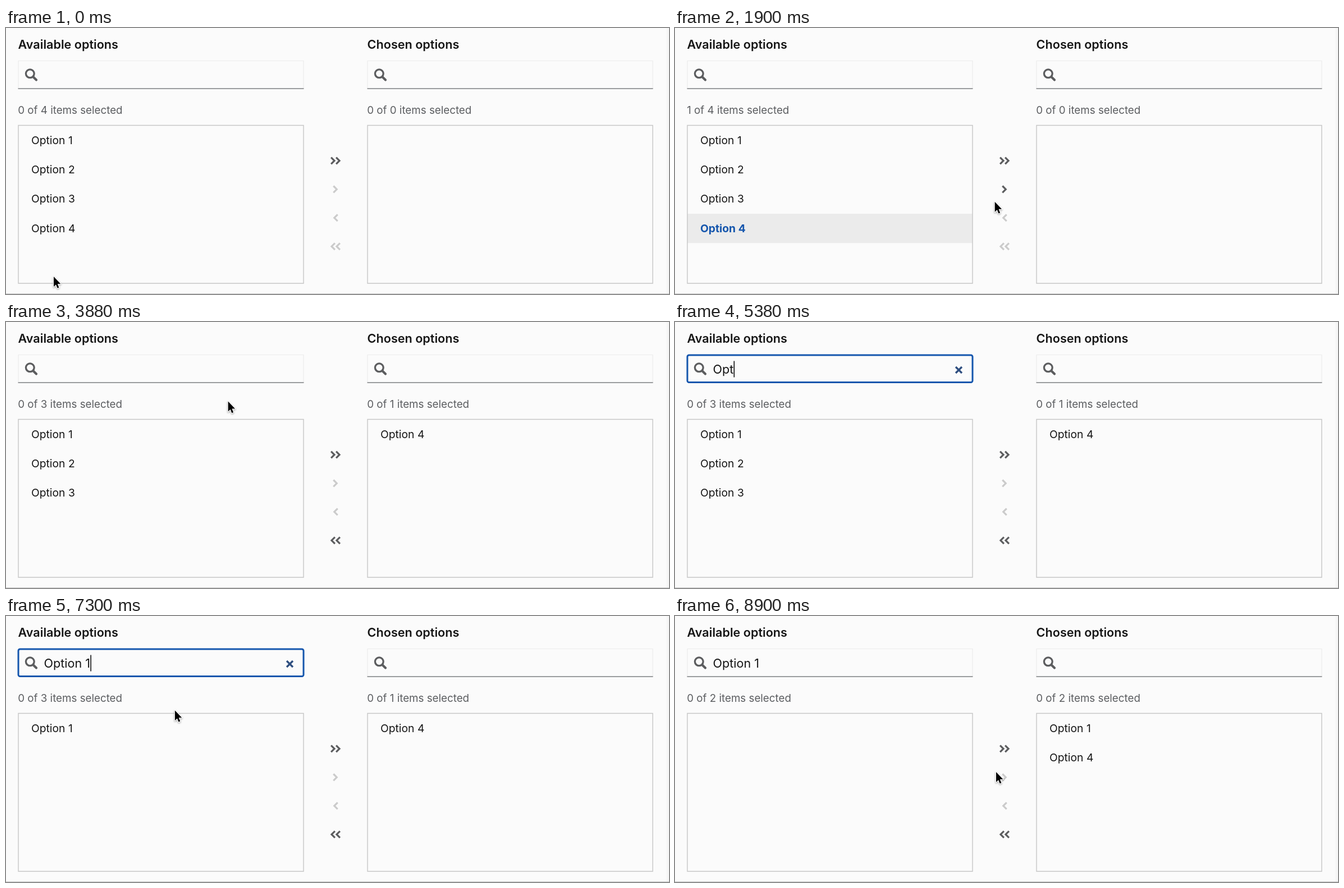
An HTML page with a canvas for the animation above (9540 ms loop, 1181x474 px).

```html
<!DOCTYPE html>
<html lang="en">
<head>
<meta charset="utf-8">
<title>Dual list selector</title>
<style>
  html, body { margin: 0; width: 100%; height: 100%; overflow: hidden; background: #fbfbfb; }
  canvas { display: block; width: 1181px; height: 474px; }
</style>
</head>
<body>
<canvas id="stage"></canvas>
<script>
const W = 1181, H = 474, LOOP = 9540;
const FONT = 'Inter, "Open Sans", sans-serif';
const INK = '#151515', GREY = '#5c5d5f', FAINT = '#cbcbcb', BLUE = '#1556ad';
const LEFT = 22, RIGHT = 644, PANEL = 508, ROW_TOP = 174, ROW = 52.3;

const canvas = document.getElementById('stage');
const ctx = canvas.getContext('2d');
const dpr = window.devicePixelRatio || 1;
canvas.width = Math.round(W * dpr);
canvas.height = Math.round(H * dpr);

// Event times in ms
const PICK_4 = 1060, MOVE_4 = 3120, FOCUS = 4320, PICK_1 = 7760, MOVE_1 = 8780;
const QUERY = 'Option 1', TYPE_START = 5084, KEY_GAP = 148, POINTER_BACK = 6880;
const BLINK = 480;

// Each move starts where the last one ended; sag bows the path downwards
const HOME = { x: 85, y: 443 };
const MOVES = [
  { from: 40, to: 600, x: 123, y: 353, sag: 0 },
  { from: 1060, to: 2000, x: 584, y: 302, sag: 52 },
  { from: 2020, to: 2960, x: 586, y: 297, sag: 40 },
  { from: 3560, to: 4040, x: 330, y: 88, sag: 0 },
  { from: 6880, to: 7720, x: 272, y: 190, sag: 29 },
  { from: 7840, to: 8200, x: 572, y: 278, sag: 0 }
];

const clamp = u => Math.min(1, Math.max(0, u));
const ease = u => u * u * (3 - 2 * u);

function pointerAt(t) {
  return MOVES.reduce((p, m) => {
    const e = ease(clamp((t - m.from) / (m.to - m.from)));
    return {
      x: p.x + (m.x - p.x) * e,
      y: p.y + (m.y - p.y) * e + m.sag * 4 * e * (1 - e)
    };
  }, HOME);
}

function stateAt(t) {
  const moved4 = t >= MOVE_4, moved1 = t >= MOVE_1;
  const keys = Math.min(QUERY.length, Math.max(0, Math.floor((t - TYPE_START) / KEY_GAP) + 1));
  const typed = QUERY.slice(0, keys);
  const options = [1, 2, 3, 4];
  const isChosen = n => (n === 4 && moved4) || (n === 1 && moved1);
  const all = options.filter(n => !isChosen(n));
  const shown = all.filter(n => ('Option ' + n).startsWith(typed));
  let picked = 0;
  if (t >= PICK_4 && !moved4) picked = 4;
  if (t >= PICK_1 && !moved1) picked = 1;

  const { x, y } = pointerAt(t);
  const inLeft = x > LEFT && x < LEFT + PANEL;
  const over = inLeft && shown[Math.floor((y - ROW_TOP) / ROW)] || 0;
  const onMove = picked > 0 && x > 571 && x < 612 && y > 262 && y < 312;
  const onSearch = inLeft && y > 58 && y < 108;
  const cursor = over || onMove ? 'hand' : onSearch ? 'beam' : 'arrow';

  const focused = t >= FOCUS && t < PICK_1;
  const lastKey = keys ? TYPE_START + (keys - 1) * KEY_GAP : FOCUS;
  return {
    x, y, all, shown, picked, over, onMove, cursor, typed, focused,
    chosen: options.filter(isChosen),
    caret: focused && (t - lastKey) % (2 * BLINK) < BLINK,
    visible: t < TYPE_START || t >= POINTER_BACK
  };
}

function text(str, x, y, size, color = INK, weight = 400) {
  ctx.font = `${weight} ${size}px ${FONT}`;
  ctx.fillStyle = color;
  ctx.fillText(str, x, y);
}

function line(points, color, width, cap = 'butt') {
  ctx.beginPath();
  points.forEach(([x, y]) => ctx.lineTo(x, y));
  ctx.strokeStyle = color;
  ctx.lineWidth = width;
  ctx.lineCap = cap;
  ctx.stroke();
}

function box(x, y, w, h, color, width, radius = 0) {
  ctx.beginPath();
  ctx.roundRect(x, y, w, h, radius);
  ctx.strokeStyle = color;
  ctx.lineWidth = width;
  ctx.stroke();
}

function searchField(x, focused) {
  if (focused) {
    box(x, 59, PANEL, 48.5, BLUE, 3, 3);
  } else {
    box(x, 58.5, PANEL, 49.5, '#ececec', 1.2);
    line([[x - 0.5, 108], [x + PANEL + 0.5, 108]], '#7e8083', 1.5);
  }
  ctx.beginPath();
  ctx.arc(x + 20.8, 81.3, 7.4, 0, Math.PI * 2);
  ctx.strokeStyle = GREY;
  ctx.lineWidth = 3.3;
  ctx.stroke();
  line([[x + 26.8, 87.4], [x + 32, 92.6]], GREY, 4.2, 'round');
}

function panel(x, title, status, items, s, active) {
  text(title, x - 0.4, 37, 21.6, INK, 600);
  searchField(x, active && s.focused);
  text(status, x - 0.8, 153, 18.75, '#5b5d60');
  items.forEach((n, i) => {
    const on = active && s.picked === n;
    if (on || (active && s.visible && s.over === n)) {
      ctx.fillStyle = '#ebebeb';
      ctx.fillRect(x, ROW_TOP + ROW * i, PANEL, ROW);
    }
    text('Option ' + n, x + 23, 206.8 + ROW * i, 19.3, on ? BLUE : INK, on ? 650 : 400);
  });
  box(x, 173.5, PANEL, 281.5, '#c6c6c6', 1.4);
}

function chevron(row, dir, tips, color) {
  const y = 236.5 + 50.9 * row, arm = 5.9;
  tips.forEach(tip => {
    const x = 587 + dir * tip, back = x - dir * arm;
    line([[back, y - arm], [x, y], [back, y + arm]], color, 3.2);
  });
}

function controls(s) {
  const one = [2.2], two = [-2, 7];
  chevron(0, 1, two, GREY);
  chevron(1, 1, one, s.onMove ? INK : s.picked ? GREY : FAINT);
  chevron(2, -1, one, FAINT);
  chevron(3, -1, two, s.chosen.length ? GREY : FAINT);
}

function query(s) {
  text(s.typed, 67.5, 92, 21.6);
  if (s.focused && s.typed) {
    [-5.5, 5.5].forEach(d => line([[505.5 - d, 80], [505.5 + d, 91]], '#2f4f80', 3.4));
  }
  if (s.caret) {
    ctx.fillStyle = '#000';
    ctx.fillRect(67.8 + ctx.measureText(s.typed).width, 69.5, 1.5, 29);
  }
}

function shadow(on) {
  ctx.shadowColor = on ? 'rgba(0,0,0,.35)' : 'transparent';
  ctx.shadowBlur = on ? 3 * dpr : 0;
  ctx.shadowOffsetY = on ? 1.3 * dpr : 0;
}

const ARROW = new Path2D('M0 0V18L4 14.2 6.6 20.6 9.4 19.4 6.8 13H12.4Z');

function arrow() {
  shadow(true);
  ctx.strokeStyle = '#fff';
  ctx.lineWidth = 2.4;
  ctx.stroke(ARROW);
  shadow(false);
  ctx.fillStyle = '#000';
  ctx.fill(ARROW);
}

// Rounded strokes for fingers and palm: a dark pass, then a thinner white one
function hand() {
  const knuckles = [0, 1, 2].map(i => [4.8 + 3.9 * i, 8.2 + i]);
  const pass = (color, width) => {
    line([[0, 2.2], [3, 14]], color, width, 'round');
    line([[-3.4, 10.4], [3, 18]], color, width, 'round');
    knuckles.forEach(([x, y]) => line([[x, y], [x, 16]], color, width, 'round'));
    line([[2, 14], [12.6, 14], [11.2, 20.8], [4.2, 20.8], [2, 14]], color, width, 'round');
    ctx.fillStyle = color;
    ctx.fill();
  };
  shadow(true);
  pass('#000', 5.4);
  shadow(false);
  pass('#fff', 2.8);
  knuckles.forEach(([x]) => line([[x + 0.6, 13.4], [x + 0.6, 18.6]], '#000', 1.2));
}

function beam() {
  line([[0, -10], [0, 10]], '#222', 1.3);
  [-1, 1].forEach(d => line([[-3.5, 11 * d], [0, 9.5 * d], [3.5, 11 * d]], '#222', 1.2));
}

const CURSORS = { arrow, hand, beam };

function draw(t) {
  const s = stateAt(t);
  ctx.setTransform(dpr, 0, 0, dpr, 0, 0);
  ctx.fillStyle = '#fbfbfb';
  ctx.fillRect(0, 0, W, H);
  ctx.fillStyle = '#f6f6f6';
  ctx.fillRect(1176.5, 0, 4.5, H);
  ctx.fillStyle = '#c9c9c9';
  ctx.fillRect(0, 473, W, 1);

  const count = s.picked ? 1 : 0;
  panel(LEFT, 'Available options', `${count} of ${s.all.length} items selected`, s.shown, s, true);
  panel(RIGHT, 'Chosen options', `0 of ${s.chosen.length} items selected`, s.chosen, s, false);
  controls(s);
  query(s);
  if (s.visible) {
    ctx.save();
    ctx.translate(s.x, s.y);
    ctx.lineJoin = 'round';
    CURSORS[s.cursor]();
    ctx.restore();
  }
}

const start = performance.now();
function frame() {
  draw((performance.now() - start) % LOOP);
  requestAnimationFrame(frame);
}
frame();
</script>
</body>
</html>
```
